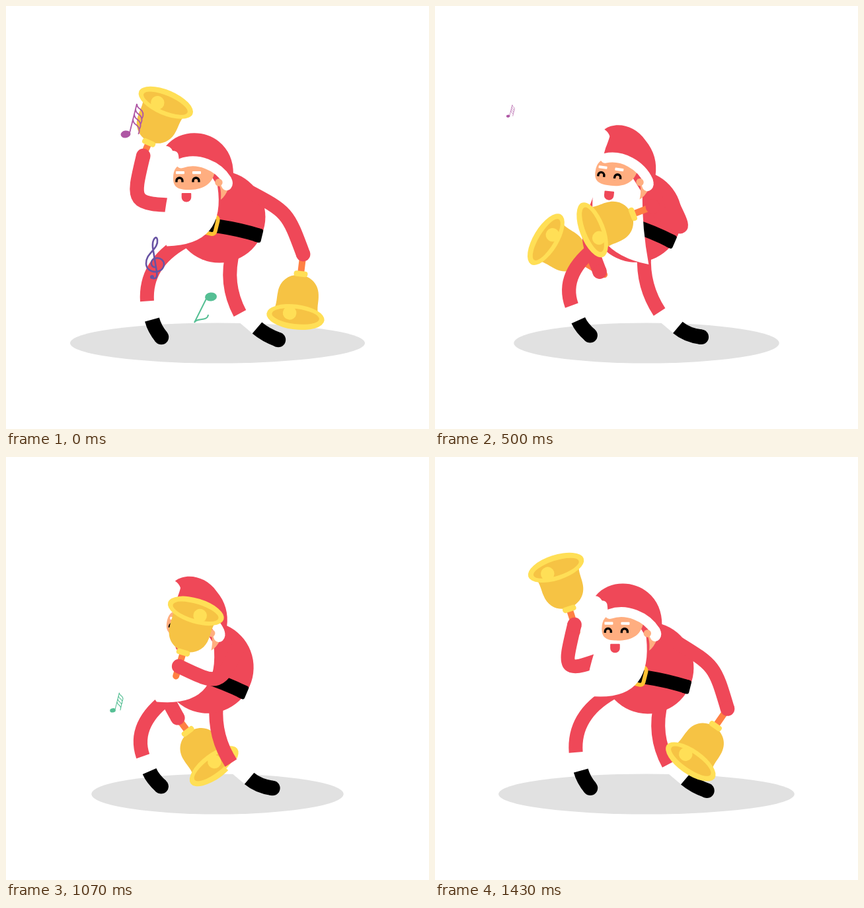
Write an HTML page with a canvas that moves like this. It is 640 px wide and 640 px high and loops after 1500 ms.

```html
<!DOCTYPE html>
<html lang="en">
<head>
<meta charset="utf-8">
<title>Bell dance</title>
<style>
html, body { margin: 0; width: 100%; height: 100%; overflow: hidden; background: #fff; }
canvas { display: block; }
</style>
</head>
<body>
<canvas id="stage" width="640" height="640"></canvas>
<script>
const ctx = document.getElementById('stage').getContext('2d');
const LOOP = 1500, STEPS = 21;
const RED = '#ef4858', SKIN = '#ffae80', GOLD = '#f6c344', YELLOW = '#ffdf56', ORANGE = '#ff8043';
const MAGENTA = '#ae56a4', VIOLET = '#6853a3', GREEN = '#55bf94';

// Key points of each bell's swing: step, neck x, neck y, angle
const LEFT_BELL = [[0, 216, 207, 203], [5, 170, 349, 168], [9, 287, 411, 66],
  [12, 328, 412, -11], [15, 275, 415, -37], [18, 182, 308, 58]];
const RIGHT_BELL = [[0, 446, 405, 7], [5, 327, 408, -26], [9, 289, 227, 170],
  [12, 315, 226, 221], [15, 268, 296, 197], [18, 355, 399, 103]];
// Legs, upright and leaning: hip, knee control, cuff, ankle, toe
const LEFT_LEG = [[268, 357, 210, 390, 213.5, 446.5, 221, 474.5, 235, 501],
  [240, 363.5, 180, 410, 204, 456, 215, 476, 234.5, 497]];
const RIGHT_LEG = [[344, 370, 330, 420, 354, 465, 380, 487, 412, 505],
  [305, 380, 307, 425, 333.5, 462, 362, 486, 399, 499]];
// Two volleys of notes: kind, color, start point, travel
const VOLLEY = 690;
const NOTES = [
  ['flags', MAGENTA, 193, 174, -106, -20], ['clef', VIOLET, 225, 382, -45, -14], ['single', GREEN, 298, 457, -40, -14],
  ['clef', MAGENTA, 186, 174, -96, -28], ['flags', GREEN, 242, 388, -131, -29], ['single', VIOLET, 298, 457, -40, -14]];

const rad = degrees => degrees * Math.PI / 180;
const mix = (a, b, u) => a + (b - a) * u;
const clamp = (v, lo, hi) => Math.min(hi, Math.max(lo, v));
const wave = (f, phase) => (1 - Math.cos(2 * Math.PI * f / STEPS - rad(phase))) / 2;

// Smooth periodic curve through the key points
function follow(keys, f) {
  f = (f + STEPS) % STEPS;
  const n = keys.length;
  const key = i => keys[(i + n) % n];
  const step = i => key(i)[0] + STEPS * Math.floor(i / n);
  let k = n - 1;
  while (keys[k][0] > f) k--;
  const h = step(k + 1) - step(k), u = (f - step(k)) / h, v = 1 - u;
  return [1, 2, 3].map(c => {
    const slope = i => (key(i + 1)[c] - key(i)[c]) / (step(i + 1) - step(i));
    const tangent = i => {
      const before = step(i) - step(i - 1), after = step(i + 1) - step(i);
      return (slope(i - 1) * after + slope(i) * before) / (before + after);
    };
    return key(k)[c] * v * v * (1 + 2 * u) + key(k + 1)[c] * u * u * (3 - 2 * u) +
      h * u * v * (tangent(k) * v - tangent(k + 1) * u);
  });
}

function fill(d, color) {
  ctx.fillStyle = color;
  ctx.fill(new Path2D(d));
}
function line(d, color, width, cap = 'butt') {
  ctx.strokeStyle = color;
  ctx.lineWidth = width;
  ctx.lineCap = cap;
  ctx.stroke(new Path2D(d));
}
function ellipse(x, y, rx, ry, color, angle = 0) {
  ctx.fillStyle = color;
  ctx.beginPath();
  ctx.ellipse(x, y, rx, ry, angle, 0, 7);
  ctx.fill();
}
function box(x, y, w, h, r, color) {
  ctx.fillStyle = color;
  ctx.beginPath();
  ctx.roundRect(x, y, w, h, r);
  ctx.fill();
}
function placed(x, y, degrees, draw) {
  ctx.save();
  ctx.translate(x, y);
  ctx.rotate(rad(degrees));
  draw();
  ctx.restore();
}

const drawNote = {
  flags(color) {
    ellipse(-12, 20, 7.5, 5.5, color, -.15);
    let d = 'M-6 18L5 -26';
    for (let i = 0; i < 4; i++) d += `M${5 - 1.9 * i} ${-26 + 8 * i}q0 5 5 8q7 5 3 14`;
    line(d, color, 1.8);
  },
  single(color) {
    ellipse(12, -17, 9, 6.5, color, -.1);
    line('M5 -14L-13 22C-10 14 7 21 8 10', color, 2);
  },
  clef(color) {
    ellipse(-4, 28, 3, 3, color);
    line('M-3 30Q5 32 3 20L-3 -17C-4 -30 3 -36 4 -28C6 -14 -14 -8 -13 8C-12 24 13 24 14 9C14 -4 -7 -4 -5 9Q-3 14 2 13', color, 2.6);
  }
};

function drawNotes(t) {
  NOTES.forEach(([kind, color, x, y, dx, dy], i) => {
    const long = kind === 'flags';
    const u = (t - (i < 3 ? 0 : VOLLEY)) / (long ? 680 : 350);
    if (u < 0 || u >= 1) return;
    placed(x + dx * u, y + dy * u, 0, () => {
      const size = 1 - u ** (long ? 1.5 : 1);
      ctx.scale(size, size);
      drawNote[kind](color);
    });
  });
}

// The clapper lags behind the turning bell; returns the gripping hand.
function drawBell(keys, f) {
  const [x, y, angle] = follow(keys, f);
  const swing = clamp((follow(keys, f + .5)[2] - follow(keys, f - .5)[2]) * .4, -15, 15);
  placed(x, y, angle, () => {
    line('M0 0V-37', ORANGE, 10, 'round');
    fill('M-34 60C-30 48 -32 40 -31 32C-30 12 -15 2 0 2C15 2 30 12 31 32C32 40 30 48 34 60Z', GOLD);
    box(-10.5, -4, 21, 8.5, 4, YELLOW);
    ellipse(0, 66, 44, 19, YELLOW);
    ellipse(0, 65, 36, 11.5, GOLD);
    ellipse(swing, 61, 10.3, 10.3, YELLOW);
  });
  const grip = 26 + 6 * Math.cos(rad(angle - 60));
  return [x + grip * Math.sin(rad(angle)), y - grip * Math.cos(rad(angle))];
}

// The elbow bows out as far as the arm's length has slack.
function drawArm([sx, sy], [hx, hy], length, bend) {
  const dx = hx - sx, dy = hy - sy, d = Math.hypot(dx, dy);
  const bow = bend * Math.sqrt(Math.max(0, length * length - d * d)) / 2;
  const elbow = `${(sx + hx) / 2 + dy / d * bow} ${(sy + hy) / 2 - dx / d * bow}`;
  line(`M${sx} ${sy}C${elbow} ${elbow} ${hx} ${hy}`, RED, 21.5);
  ellipse(hx, hy, 10.8, 10.8, RED);
}

function drawLeg([upright, leaning], p) {
  const [x, y, cx, cy, kx, ky, ax, ay, tx, ty] = upright.map((v, i) => mix(v, leaning[i], p));
  line(`M${kx} ${ky}L${ax} ${ay}`, '#fff', 22);
  line(`M${x} ${y}Q${cx} ${cy} ${kx} ${ky}`, RED, 21);
  line(`M${ax} ${ay}Q${ax + (ax - kx) / 2} ${ay + (ay - ky) / 2} ${tx} ${ty}`, '#000', 22.5);
  ellipse(tx, ty, 11.25, 11.25, '#000');
}

function drawTorso(p) {
  ellipse(0, 0, 69.5, 69.5, RED);
  ctx.rotate(rad(13.5 + 3 * p));
  line('M-71 27Q0 9 66 13.5', '#000', 21);
  box(58, 3, 11.5, 21, 3, '#000');
  ctx.strokeStyle = '#ffc233';
  ctx.lineWidth = 6;
  ctx.beginPath();
  ctx.roundRect(-31, 1, 30, 27, 5);
  ctx.stroke();
}

function drawBeard(f, p) {
  const ear = [320 - 9 * p, 272 + 16 * p], cheek = [245 - 8 * p, 285 - 5 * p];
  const tip = [cheek[0] + 84 - 112 * wave(f, 122), cheek[1] + 112 - 36 * wave(f, 150)];
  const dx = tip[0] - ear[0], dy = tip[1] - ear[1];
  const bulge = (3 - .85 * dx) / Math.hypot(dx, dy);
  const right = [(ear[0] + tip[0]) / 2 + dy * bulge, (ear[1] + tip[1]) / 2 - dx * bulge];
  const left = [cheek[0] - 45 * wave(f, 60), mix(tip[1], cheek[1], .15 + .3 * wave(f, 90))];
  fill(`M${cheek}V${cheek[1] - 15}L${ear[0] - 20} ${ear[1] - 32}L${ear}Q${right} ${tip}Q${left} ${cheek}Z`, '#fff');
}

function drawHead(p) {
  const flip = Math.sin(clamp(p, 0, 1) * Math.PI / 2);
  const at = (x, y, x2, y2) => `${mix(x, x2, flip)} ${mix(y, y2, flip)} `;
  const peak = at(242, 212, 260, 193);
  fill('M317 262Q327 272 325 293Q332 288 337 275Z', SKIN);
  fill('M253 260C253 247 259 240 268 239L310 240L316 250C312 274 292 279 272 278C256 277 253 270 253 260Z', SKIN);
  fill(`M${peak}C${at(262, 187, 274, 180)}${at(300, 187, 303, 181)}${at(322, 205, 322, 203)}
    C337 217 344 234 344 254L300 240L262 234L${at(261, 226, 264, 222)}
    Q${at(260, 219, 269, 202)}${at(252, 219, 269, 202)}Q${at(248, 212, 266, 196)}${peak}Z`, RED);
  line('M265 238C290 229 320 241 334 263', '#fff', 15, 'round');
  ellipse(334, 268, 9, 11, '#fff');
  ellipse(322, 267, 5.7, 5.7, SKIN);
  for (const x of [257, 282]) {
    box(x, 250, 13, 4.2, 1, '#fff');
    line(`M${x + 1} 266.5v-2a4.5 4.5 0 0 1 9 0v2`, '#000', 3.4);
  }
}

function drawScene(f) {
  const p = wave(f, 6), turn = 2 * Math.PI * f / STEPS;
  const bodyX = 323 - 27 * p, bodyY = 319 - p, tilt = 11 * p;
  const onBody = (x, y) => {
    const c = Math.cos(rad(tilt)), s = Math.sin(rad(tilt));
    return [bodyX + x * c - y * s, bodyY + x * s + y * c];
  };
  ctx.clearRect(0, 0, 640, 640);
  const squeeze = .9 * wave(f, 0) - .1 * Math.sin(turn) + .12 * Math.sin(2 * turn);
  ellipse(320, 510, 223 - 46 * squeeze, 30.5, '#e1e1e1');

  const leftShoulder = onBody(-58, -17);
  const leftHand = drawBell(LEFT_BELL, f);
  drawArm(leftShoulder, leftHand, 150, clamp((leftShoulder[0] - leftHand[0] - 10) / 20, -.4, 1));
  drawLeg(LEFT_LEG, p);
  drawLeg(RIGHT_LEG, p);
  placed(bodyX, bodyY, tilt, () => drawTorso(p));
  drawBeard(f, p);
  placed(bodyX, bodyY, tilt, () => {
    ctx.translate(-323, -319);
    drawHead(p);
  });
  placed(273 - 13 * p, 283 - 4 * p, 8 * p, () => box(-7.3, 0, 14.6, 13.5, [1, 1, 7, 7], RED));

  const rightHand = drawBell(RIGHT_BELL, f);
  drawArm(onBody(43, -39), rightHand, 136, 1);
  drawNotes(f * LOOP / STEPS);
}

function tick() {
  const t = performance.now() % LOOP;
  drawScene(Math.floor((t + 4) * STEPS / LOOP) % STEPS);
  requestAnimationFrame(tick);
}
tick();
</script>
</body>
</html>
```
